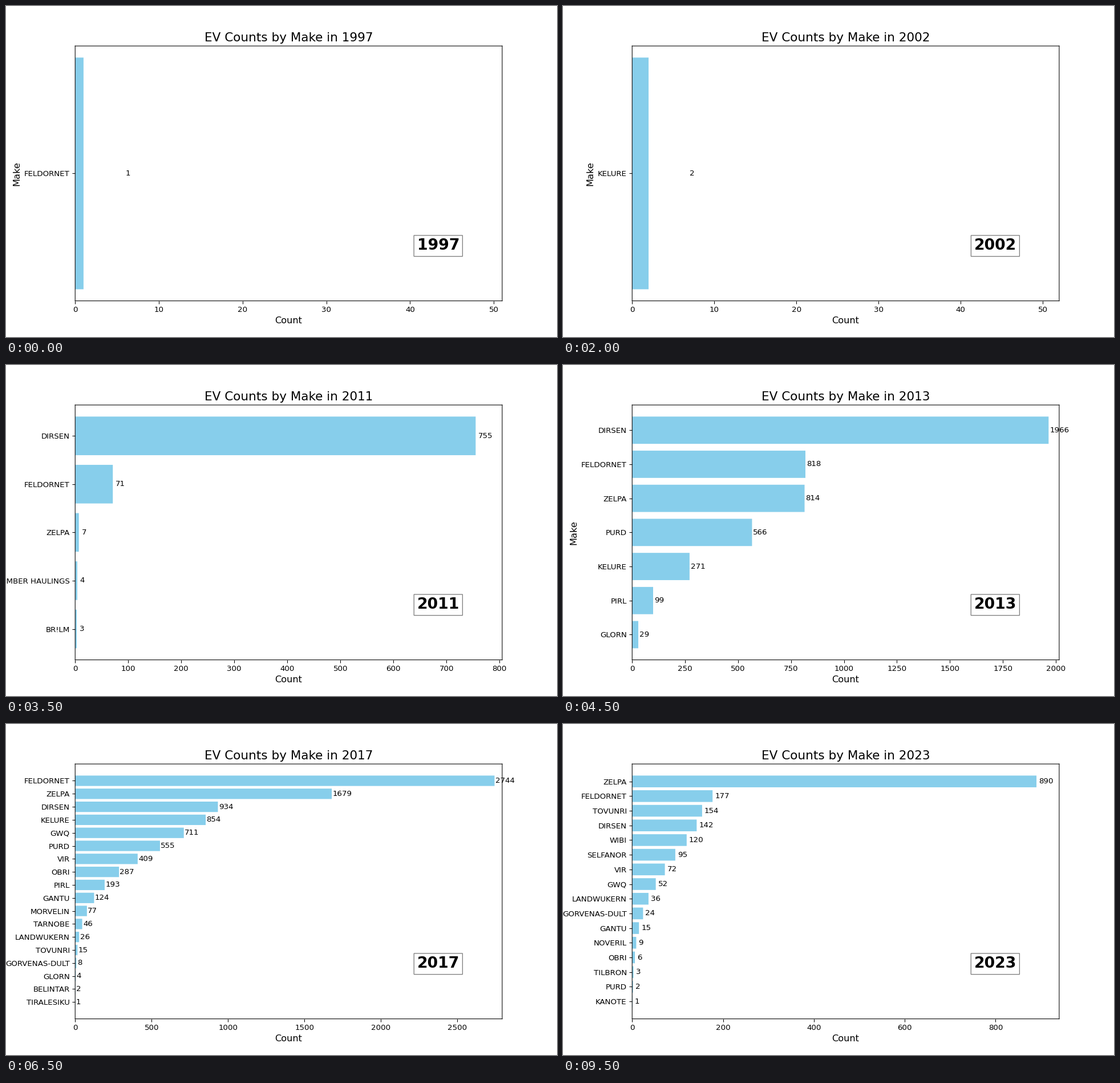
Recreate the animation shown at these times as a matplotlib script. Size 966x580 px, loop 10 s.

```python
import matplotlib.pyplot as plt
from matplotlib.animation import FuncAnimation

# Unsnapped lines keep their fractional pixel positions.
plt.rcParams.update({"font.family": "DejaVu Sans", "path.snap": False})

FALL = 1.6  # how long the ranking stays high before it drops off
years = []


def add_year(year, makes, *head, last=1):
    """Leading counts are given; the rest fall off geometrically to `last`."""
    makes = makes.split(",")
    rest = len(makes) - len(head)
    ratio = last / head[-1]
    tail = [round(head[-1] * ratio ** ((k / rest) ** FALL))
            for k in range(1, rest + 1)]
    years.append((year, makes, [*head, *tail]))


add_year(1997, "FELDORNET", 1)
add_year(1998, "PURD", 1)
add_year(1999, "PURD", 3)
add_year(2000, "PURD", 10)
add_year(2002, "KELURE", 2)
add_year(2008, "ZELPA", 23)
add_year(2010, "ZELPA", 24)
add_year(2011, "DIRSEN,FELDORNET,ZELPA,UMBER HAULINGS,BR!LM",
         755, 71, 7, 4, last=3)
add_year(2012, "DIRSEN,FELDORNET,KELURE,ZELPA,PURD,TIGBEL,TIRALESIKU,"
         "UMBER HAULINGS", 617, 490, 390, last=3)
add_year(2013, "DIRSEN,FELDORNET,ZELPA,PURD,KELURE,PIRL,GLORN",
         1966, 818, 814, last=29)
add_year(2014, "DIRSEN,PURD,ZELPA,FELDORNET,GWQ,KELURE,PIRL,GLORN,"
         "GORVENAS-DULT,BELINTAR,TIRALESIKU,TARNOBE,MURKO", 1880, 700, 650)
add_year(2015, "DIRSEN,ZELPA,PURD,GWQ,FELDORNET,PIRL,LANDWUKERN,VIR,"
         "GORVENAS-DULT,GLORN,KELURE,TARNOBE", 1830, 1150, 420, last=30)
add_year(2016, "ZELPA,DIRSEN,PURD,FELDORNET,GWQ,VIR,LANDWUKERN,OBRI,PIRL,"
         "GANTU,GORVENAS-DULT,TARNOBE,TOVUNRI,BELINTAR,GLORN,TIRALESIKU,"
         "KELURE", 1700, 1060, 640)
add_year(2017, "FELDORNET,ZELPA,DIRSEN,KELURE,GWQ,PURD,VIR,OBRI,PIRL,GANTU,"
         "MORVELIN,TARNOBE,LANDWUKERN,TOVUNRI,GORVENAS-DULT,GLORN,BELINTAR,"
         "TIRALESIKU", 2744, 1679, 934)
add_year(2018, "ZELPA,DIRSEN,FELDORNET,KELURE,GWQ,MURKO,PURD,MORVELIN,VIR,"
         "TIRALESIKU,GANTU,OBRI,LANDWUKERN,WIBI,GORVENAS-DULT,PIRL,GLORN,"
         "TARNOBE,BELINTAR,TOVUNRI", 8013, 1210, 1180, last=30)
add_year(2019, "ZELPA,FELDORNET,DIRSEN,VIR,OBRI,KELURE,GWQ,PURD,LANDWUKERN,"
         "MORVELIN,TOVUNRI,MURKO,SELBUR,GANTU,WIBI,TARNOBE,TIRALESIKU,"
         "GORVENAS-DULT,KANOTE,GLORN,PIRL,FELL GADON", 4650, 1090, 950)
add_year(2020, "ZELPA,FELDORNET,DIRSEN,VIR,KELURE,MORVELIN,OBRI,TOVUNRI,"
         "GANTU,TARNOBE,GWQ,TIRALESIKU,MURKO,SELBUR,PURD,GORVENAS-DULT,"
         "FELL GADON,TILBRON,WIBI,RALDEST", 7018, 1014, 580)
add_year(2021, "ZELPA,LANDWUKERN,PURD,KELURE,FELDORNET,GWQ,GANTU,DIRSEN,"
         "MORVELIN,VIR,OBRI,TILD,SELFANOR,TARNOBE,TOVUNRI,MURKO,WIBI,"
         "TILBRON,GORVENAS-DULT,SELBUR,RALDEST", 10600, 1150, 1000)
add_year(2022, "ZELPA,VIR,GWQ,PURD,GANTU,ELTINO,TILD,OBRI,TOVUNRI,FELDORNET,"
         "DIRSEN,KELURE,LANDWUKERN,MORVELIN,WIBI,TIRALESIKU,TARNOBE,SELFANOR,"
         "GORVENAS-DULT,TILBRON,FEBIN,NEPIR,KANOTE,SELBUR,FELL GADON",
         14733, 2050, 1100, last=5)
add_year(2023, "ZELPA,FELDORNET,TOVUNRI,DIRSEN,WIBI,SELFANOR,VIR,GWQ,"
         "LANDWUKERN,GORVENAS-DULT,GANTU,NOVERIL,OBRI,TILBRON,PURD,KANOTE",
         890, 177, 154)

# The tiny surplus in height keeps the canvas from rounding down below 580 px.
fig, ax = plt.subplots(figsize=(10, 6.0042), dpi=96.6)
# Half a pixel right and down, so that the frame lines sit on pixel centres.
fig.subplots_adjust(left=0.1255, right=0.9005, bottom=0.1092, top=0.8792)


def draw(index):
    year, makes, counts = years[index]
    ax.clear()
    ax.barh(makes, counts, color="skyblue")
    ax.invert_yaxis()
    ax.set_xlim(0, max(counts) + 50)
    ax.set_title(f"EV Counts by Make in {year}", fontsize=16)
    ax.set_xlabel("Count", fontsize=12)
    ax.set_ylabel("Make", fontsize=12)
    for row, count in enumerate(counts):
        ax.text(count + 5, row, str(count), va="center")
    ax.text(0.9, 0.2, str(year), transform=ax.transAxes, ha="right",
            fontsize=20, fontweight="bold",
            bbox=dict(facecolor="white", alpha=0.5))
    return []


anim = FuncAnimation(fig, draw, frames=len(years), interval=500, repeat=True)
plt.show()
```
